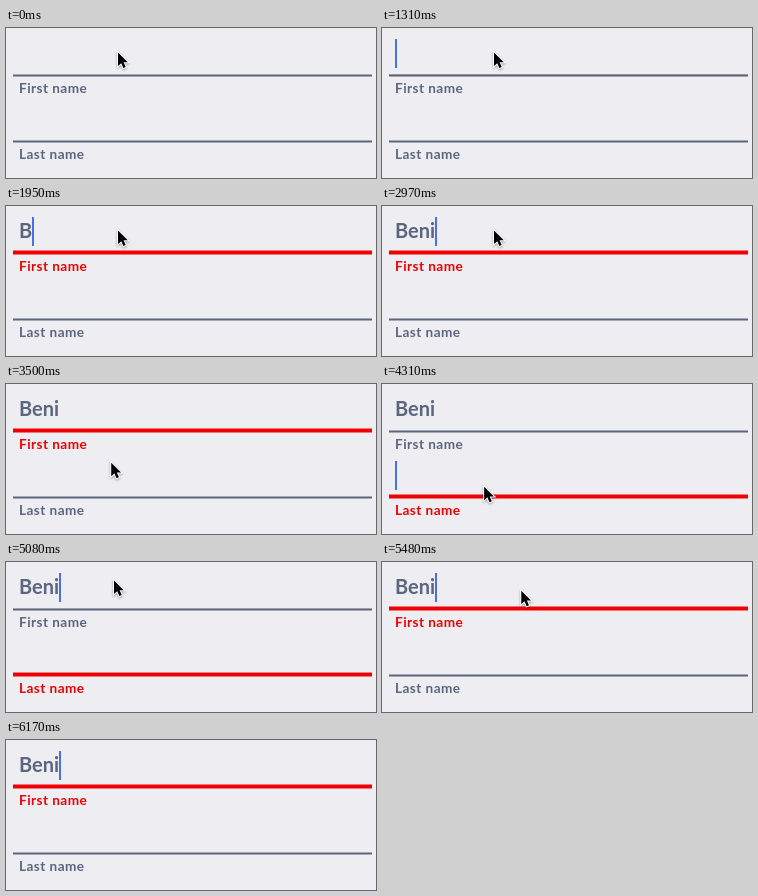
Write an HTML page that moves like this. It is 370 by 150 pixels and loops after 6340 ms.

```html
<!DOCTYPE html>
<html lang="en">
<head>
<meta charset="utf-8">
<style>
  html, body { margin: 0; width: 100%; height: 100%; overflow: hidden; background: #eeedf2; }
  svg { display: block; width: 370px; height: 150px; font-family: Lato, "Open Sans", sans-serif; font-weight: 700; }
  .label { font-size: 13.6px; letter-spacing: .45px; }
  .calm { fill: #5b667e; }
  .hot { fill: #f00000; }
  #value { font-size: 20px; }
  #mouse { filter: drop-shadow(0 1px 1px #0005); }
</style>
</head>
<body>
<svg viewBox="0 0 370 150">
  <g id="fields"></g>
  <text id="value" class="calm" x="13" y="32"></text>
  <rect id="caret" width="2" height="29" fill="#4a70e8"/>
  <path id="mouse" d="M0 0V13.6L3.2 10.7 5.4 15.6 7.7 14.6 5.6 9.8H9.8Z" fill="#000" stroke="#fff" stroke-width="2" paint-order="stroke"/>
</svg>
<script>
const LOOP = 6340, FADE = 300, NAME = "Beni";
const KEYS = [1950, 2370, 2610, 2970];
const CALM = [91, 102, 126], HOT = [240, 0, 0];
const $ = id => document.getElementById(id);
const clamp = x => Math.min(1, Math.max(0, x));
const mix = (a, b, p) => a + (b - a) * p;
const smooth = p => p * p * (3 - 2 * p);

// focus changes: [time, gains focus]
const fields = [
  { text: "First name", base: 48.5, focus: [[1290, true], [3820, false], [5075, true]] },
  { text: "Last name", base: 114.5, focus: [[3820, true], [5075, false]] }
];

// pointer stops: [time, x, y]
const stops = [
  [3290, 112, 24.5], [3630, 102, 104.5], [4270, 102, 104.5], [4740, 108, 18.5],
  [5380, 108, 18.5], [5480, 139, 28.5], [5700, 200, 64], [6120, 318, 152]
];

// caret visibility: [from, to, field]
const carets = [[1310, 3400, 0], [3920, 4420, 1], [5020, 5550, 0], [6060, LOOP, 0]];

function add(parent, tag, attrs, text = "") {
  const el = document.createElementNS("http://www.w3.org/2000/svg", tag);
  for (const k in attrs) el.setAttribute(k, attrs[k]);
  el.textContent = text;
  parent.append(el);
  return el;
}

for (const f of fields) {
  f.line = add($("fields"), "rect", { x: 7, width: 359 });
  f.calm = add($("fields"), "text", { class: "label calm", x: 13 }, f.text);
  f.hot = add($("fields"), "text", { class: "label hot", x: 13 }, f.text);
}

function placeLabel(el, y, alpha) {
  el.setAttribute("y", y);
  el.setAttribute("opacity", alpha);
}

function drawField(f, t) {
  const [start, on] = f.focus.filter(e => e[0] <= t).pop() || [-LOOP, false];
  const age = t - start, p = clamp(age / FADE), heat = on ? p : 1 - p;
  const height = mix(2, 4, heat);
  f.line.setAttribute("y", f.base - height);
  f.line.setAttribute("height", height);
  f.line.setAttribute("fill", `rgb(${CALM.map((c, i) => Math.round(mix(c, HOT[i], heat)))})`);

  // the old label rises away, then the new one rises into place
  const out = clamp(age / 180) ** 2, into = smooth(clamp((age - 140) / 160));
  const y = f.base + 16.2;
  placeLabel(on ? f.calm : f.hot, y - 4 * out, 1 - out);
  placeLabel(on ? f.hot : f.calm, y + 4 * (1 - into), into);
}

function pointer(t) {
  const i = stops.findIndex(s => s[0] > t);
  if (i < 0) return [400, 200];
  if (i === 0) return stops[0].slice(1);
  const [t0, x0, y0] = stops[i - 1], [t1, x1, y1] = stops[i];
  const q = (t - t0) / (t1 - t0), p = i < 5 ? smooth(q) : q;
  return [mix(x0, x1, p), mix(y0, y1, p)];
}

function draw(t) {
  fields.forEach(f => drawField(f, t));
  $("value").textContent = NAME.slice(0, KEYS.filter(k => k <= t).length);

  const caret = carets.find(([from, to]) => t >= from && t < to);
  $("caret").setAttribute("visibility", caret ? "visible" : "hidden");
  if (caret) {
    const second = caret[2] === 1;
    $("caret").setAttribute("x", 13 + (second ? 0 : Math.floor($("value").getComputedTextLength())));
    $("caret").setAttribute("y", second ? 77 : 11);
  }
  $("mouse").setAttribute("transform", `translate(${pointer(t)})`);
}

const begin = performance.now();
function tick() {
  draw((performance.now() - begin) % LOOP);
  requestAnimationFrame(tick);
}
tick();
</script>
</body>
</html>
```
